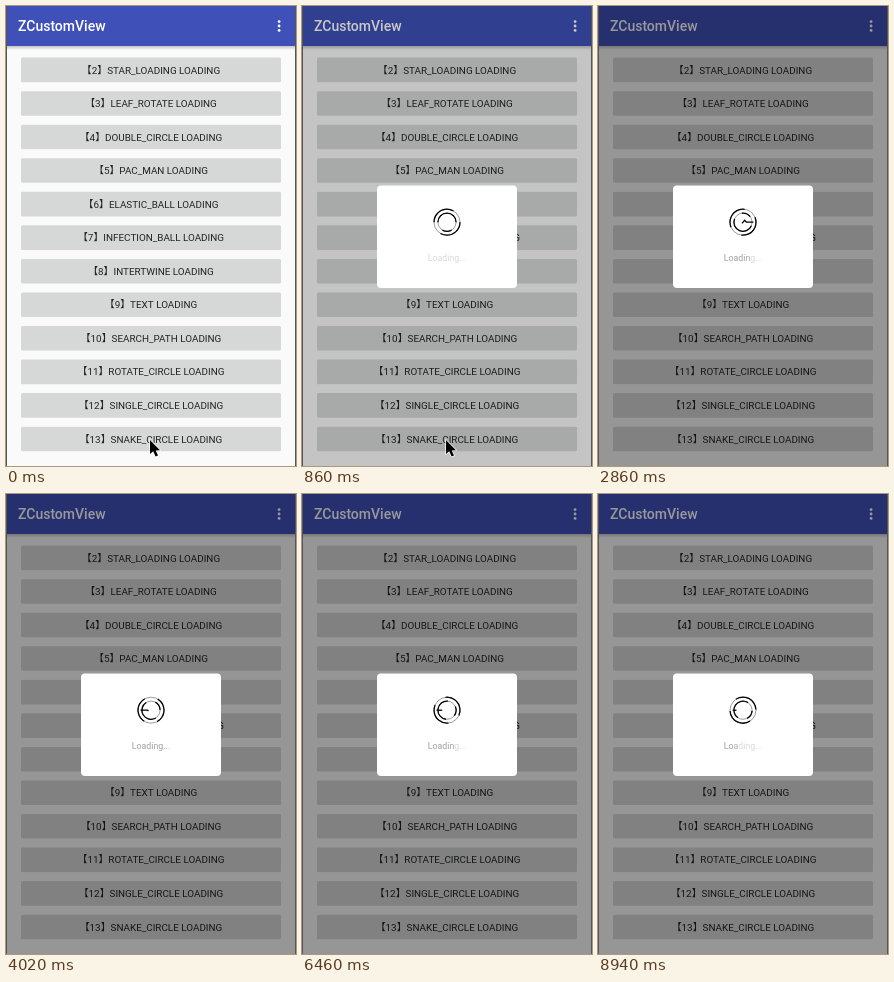
These frames come from a looping animation (290x460 px, 8.98 s). An HTML page with a canvas:

```html
<!DOCTYPE html>
<html lang="en">
<head>
<meta charset="utf-8">
<title>Loading dialog</title>
<style>
  html, body { margin: 0; width: 100%; height: 100%; overflow: hidden; background: #fafafa; }
  canvas { display: block; width: 290px; height: 460px; }
</style>
</head>
<body>
<canvas id="stage"></canvas>
<script>
const W = 290, H = 460, LOOP = 8980;
const SHOW = 740;     // dialog opens
const START = 1010;   // loader starts moving
const TURN = 1288;    // one turn of the rings
const STEP = 322;     // one letter of the label
const LABEL = 'Loading...';
const NAMES = ['STAR_LOADING', 'LEAF_ROTATE', 'DOUBLE_CIRCLE', 'PAC_MAN', 'ELASTIC_BALL',
  'INFECTION_BALL', 'INTERTWINE', 'TEXT', 'SEARCH_PATH', 'ROTATE_CIRCLE', 'SINGLE_CIRCLE', 'SNAKE_CIRCLE'];
const SNAKE = [[-10.4, 0], [-3.4, 0], [-1.7, 1.9], [1.7, -1.9], [3.4, 0], [10.4, 0]];
const ARROW = [[0, 0], [0, 14], [3.2, 11.2], [5.6, 16.6], [8, 15.5], [5.7, 10.4], [10, 10.2]];
const TRAIL = [[1450, 144, 434], [1580, 154, 401], [1620, 161, 388], [1900, 268, 228]];
const FONT = 'Roboto, "Noto Sans CJK SC", "Noto Sans CJK JP", sans-serif';

const canvas = document.getElementById('stage');
const ctx = canvas.getContext('2d');
const ratio = window.devicePixelRatio || 1;
canvas.width = W * ratio;
canvas.height = H * ratio;

const clamp = x => Math.min(1, Math.max(0, x));
const snakeLength = SNAKE.slice(1).reduce((sum, [x, y], i) =>
  sum + Math.hypot(x - SNAKE[i][0], y - SNAKE[i][1]), 0);

function box(x, y, w, h, r, color) {
  ctx.fillStyle = color;
  ctx.beginPath();
  ctx.roundRect(x, y, w, h, r);
  ctx.fill();
}

function text(str, x, y, font, color, align = 'center') {
  ctx.font = font + ' ' + FONT;
  ctx.fillStyle = color;
  ctx.textAlign = align;
  ctx.fillText(str, x, y);
}

function trace(points) {
  ctx.beginPath();
  points.forEach(([x, y]) => ctx.lineTo(x, y));
}

// Arc in degrees around the current origin
function arc(r, from, sweep) {
  ctx.beginPath();
  ctx.arc(0, 0, r, from * Math.PI / 180, (from + sweep) * Math.PI / 180);
  ctx.stroke();
}

function drawPage(t) {
  box(0, 0, W, H, 0, '#fafafa');
  const shade = ctx.createLinearGradient(0, 40, 0, 44);
  shade.addColorStop(0, 'rgba(0,0,0,.22)');
  shade.addColorStop(1, 'rgba(0,0,0,0)');
  box(0, 40, W, 4, 0, shade);
  box(0, 0, W, 40, 0, '#3f50b9');
  text('ZCustomView', 12, 25, '500 14px', '#fff', 'left');
  for (const y of [15.6, 20, 24.4]) box(271.7, y - 1.4, 2.8, 2.8, 1.4, '#fff');

  NAMES.forEach((name, i) => {
    const y = 64 + i * 33.55;
    const pressed = i === 11 && t >= 160 && t < 490;
    box(15, y - 12.4, 260, 24.6, 1.5, pressed ? '#c8c9c9' : '#d6d7d7');
    text(`【${i + 2}】${name} LOADING`, 145, y + 3.5, '9.9px', '#222');
  });
}

function drawLoader(t) {
  const turns = Math.max(0, t - START) / TURN;
  const part = turns % 1;
  const angle = part * 360;
  ctx.save();
  ctx.translate(145, 216.2);
  ctx.strokeStyle = 'rgba(0,0,0,.6)';
  ctx.lineWidth = 0.65;
  arc(13, 0, 360);
  arc(9.1, 0, 360);

  ctx.strokeStyle = '#000';
  ctx.lineWidth = 1.3;
  arc(13, angle, 120);
  arc(13, angle + 180, 120);
  arc(9.1, 60 - angle, 60);
  arc(9.1, 180 - angle, 180);

  // The snake grows from the left, then its tail follows to the right
  const growing = Math.floor(turns) % 2 === 0;
  const from = growing ? 0 : part * snakeLength;
  const to = growing ? part * snakeLength : snakeLength;
  if (to > from) {
    ctx.setLineDash([0, from, to - from, 99]);
    trace(SNAKE);
    ctx.stroke();
  }
  ctx.restore();
}

function drawLabel(t) {
  const size = '8.8px';
  ctx.font = size + ' ' + FONT;
  const left = 145 - ctx.measureText(LABEL).width / 2;
  text(LABEL, left, 255.4, size, 'rgba(136,136,136,.33)', 'left');
  if (t < START) return;
  const pos = (t - START) / STEP % (LABEL.length + 1);
  for (let i = 0; i < LABEL.length && i < pos; i++) {
    const x = left + ctx.measureText(LABEL.slice(0, i)).width;
    const alpha = 0.6 * clamp(0.3 + (pos - i) * 0.7);
    text(LABEL[i], x, 255.4, size, `rgba(136,136,136,${alpha})`, 'left');
  }
}

function drawCursor(t) {
  const last = TRAIL.length - 1;
  if (t >= TRAIL[last][0]) return;
  let [, x, y] = TRAIL[0];
  for (let i = 0; i < last; i++) {
    const [t0, x0, y0] = TRAIL[i], [t1, x1, y1] = TRAIL[i + 1];
    if (t < t0) break;
    const k = clamp((t - t0) / (t1 - t0));
    x = x0 + (x1 - x0) * k;
    y = y0 + (y1 - y0) * k;
  }
  ctx.save();
  ctx.translate(x, y);
  trace(ARROW);
  ctx.closePath();
  ctx.lineJoin = 'round';
  ctx.lineWidth = 1.4;
  ctx.strokeStyle = '#fff';
  ctx.stroke();
  ctx.fillStyle = '#000';
  ctx.fill();
  ctx.restore();
}

function draw(t) {
  ctx.setTransform(ratio, 0, 0, ratio, 0, 0);
  drawPage(t);
  if (t >= SHOW) {
    const dim = 0.4 * clamp((t - SHOW + 20) / 260);
    box(0, 0, W, H, 0, `rgba(0,0,0,${dim})`);
    box(75, 179.5, 140, 102.5, 4, '#fff');
    drawLoader(t);
    drawLabel(t);
  }
  drawCursor(t);
  box(0, 0, 1, H, 0, '#555');
  box(W - 1, 0, 1, H, 0, '#555');
}

const begin = performance.now();
function frame() {
  draw((performance.now() - begin) % LOOP);
  requestAnimationFrame(frame);
}
frame();
</script>
</body>
</html>
```
